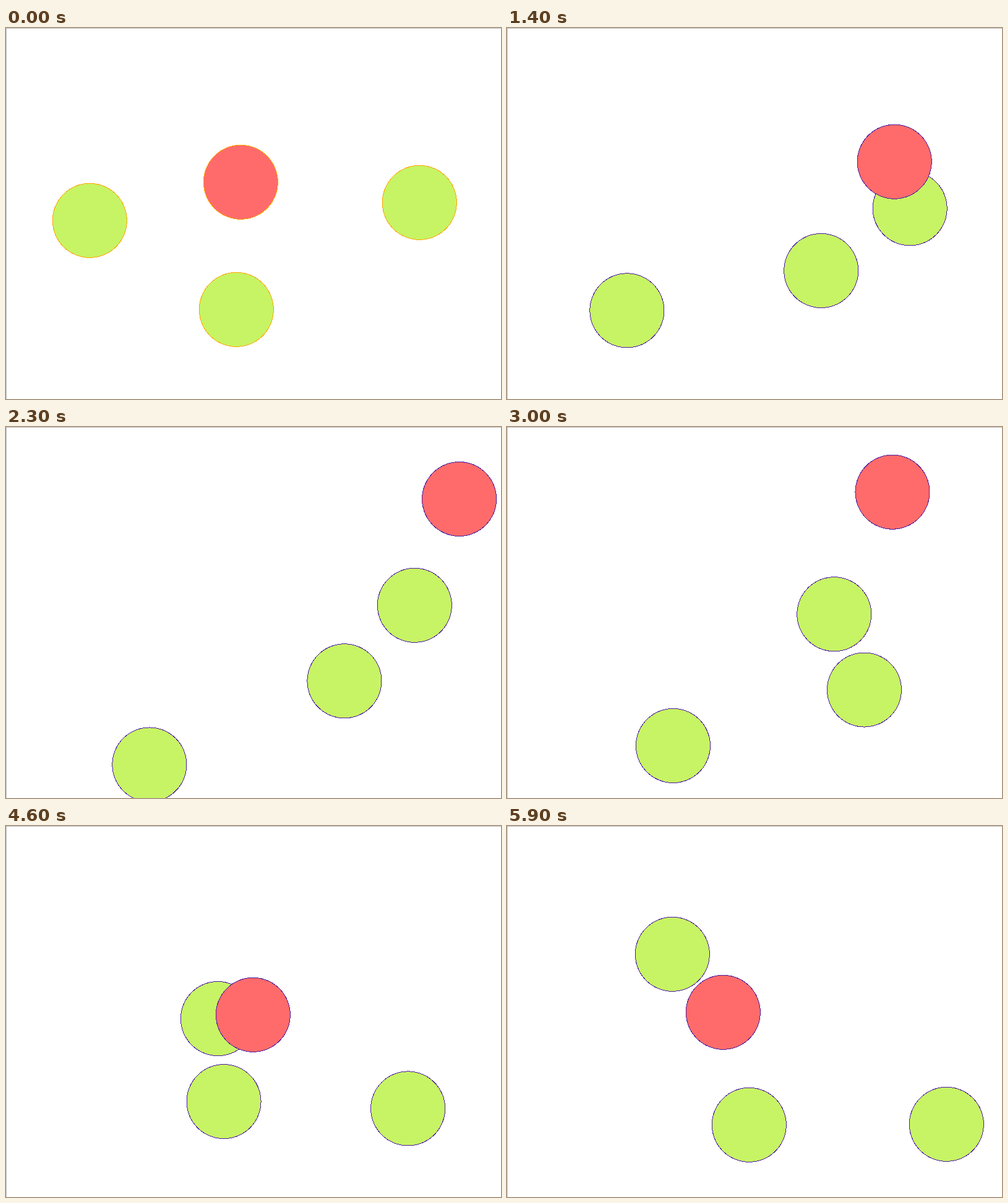
An HTML page with a canvas for the animation above (6000 ms loop, 800x600 px).

```html
<!DOCTYPE html>
<html lang="en">
<head>
<meta charset="utf-8">
<title>Bouncing balls</title>
<style>
  html, body { margin: 0; width: 100%; height: 100%; overflow: hidden; background: #fff; }
  canvas { display: block; }
</style>
</head>
<body>
<canvas id="stage" width="800" height="600"></canvas>
<script>
const ctx = document.getElementById('stage').getContext('2d');
const LOOP = 6000, STEP = 100, RADIUS = 60;
const RIGHT = 752, TOP = RADIUS;
const GREEN = '#c7f464', RED = '#ff6b6b';

// Balls fly straight between collisions, given as [step, x, y].
// Positions beyond the right or top wall are mirrored back inside.
const balls = [
  { fill: GREEN, hits: [[0, 135, 311], [22.7, 230, 547], [49.5, 370, 430], [59, 391, 483]] },
  { fill: GREEN, hits: [[0, 372, 455], [10, 490, 384], [38, 612, 441], [59, 710, 482]] },
  { fill: GREEN, hits: [[0, 668, 282], [10, 565, 293], [23, 844, 288],
                        [39.5, 1154, 322], [51, 1168, 303], [59, 1237, 207]] },
  { fill: RED, hits: [[0, 379, 249], [16.5, 670, 210], [39.5, 1030, -122],
                      [46, 1105, -185], [59, 1155, -181]] }
];

function positionAt(hits, step) {
  const next = Math.max(1, hits.findIndex(hit => hit[0] >= step));
  const [t0, x0, y0] = hits[next - 1], [t1, x1, y1] = hits[next];
  const k = (step - t0) / (t1 - t0);
  const x = x0 + (x1 - x0) * k, y = y0 + (y1 - y0) * k;
  return [RIGHT - Math.abs(RIGHT - x), TOP + Math.abs(TOP - y)];
}

// Hard-edged disc, filled row by row.
function disc(x, y, radius, color) {
  ctx.fillStyle = color;
  for (let row = Math.round(y - radius); row < y + radius; row++) {
    const dy = row + 0.5 - y;
    const half = Math.sqrt(Math.max(0, radius * radius - dy * dy));
    const left = Math.round(x - half);
    ctx.fillRect(left, row, Math.round(x + half) - left, 1);
  }
}

function draw(step) {
  ctx.fillStyle = '#fff';
  ctx.fillRect(0, 0, 800, 600);
  const outline = step === 0 ? '#ffa500' : '#4b1a9e';
  for (const { fill, hits } of balls) {
    const [x, y] = positionAt(hits, step).map(v => v + 0.3);
    disc(x, y, RADIUS + 0.5, outline);
    disc(x, y, RADIUS - 0.5, fill);
  }
  ctx.fillStyle = '#bbb';
  ctx.fillRect(0, 0, 800, 1);
  ctx.fillRect(0, 0, 1, 600);
}

function tick() {
  draw(Math.floor(performance.now() % LOOP / STEP));
  requestAnimationFrame(tick);
}
tick();
</script>
</body>
</html>
```
